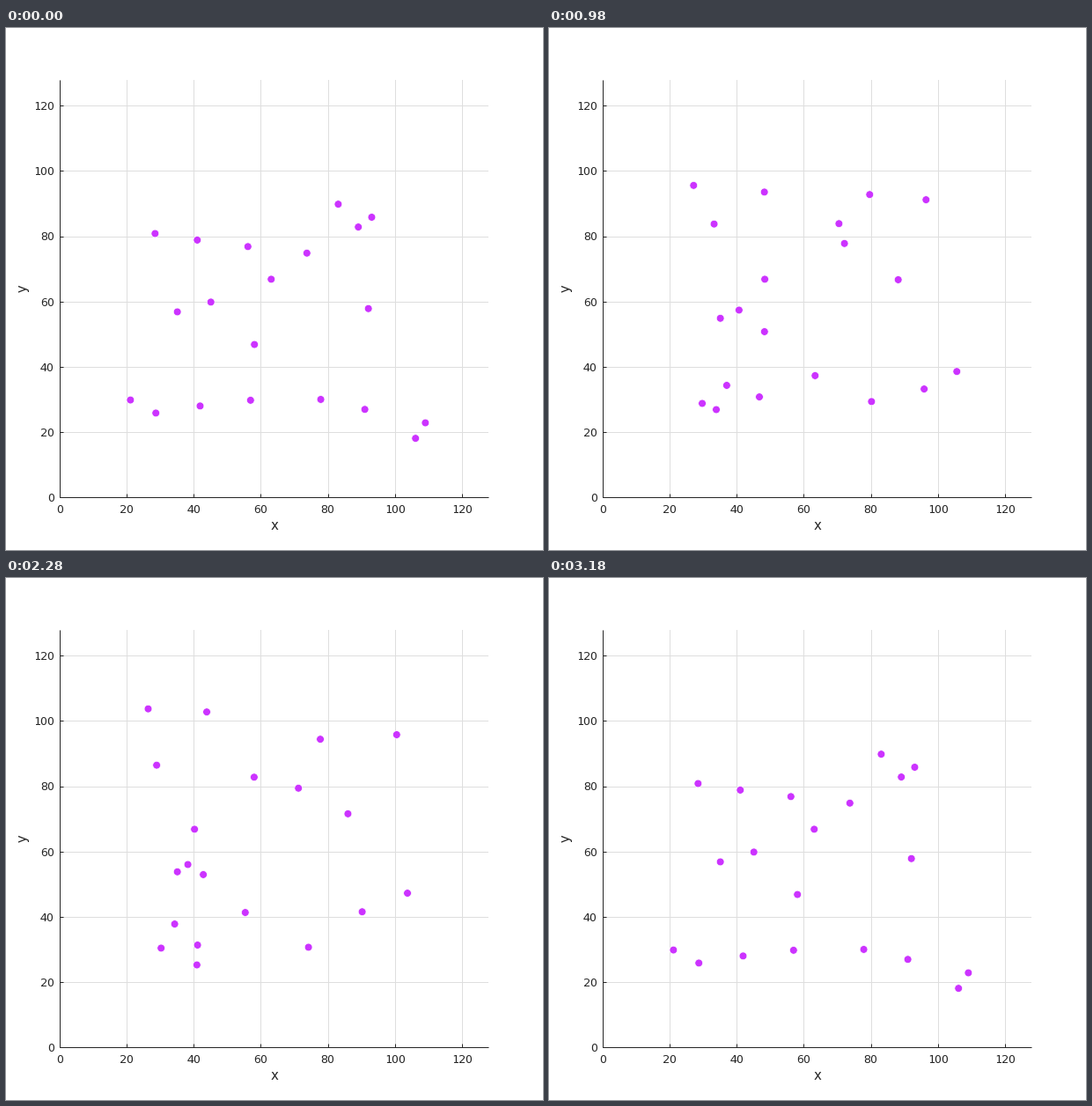
These frames come from a looping animation (610 px wide and 593 px high, 3.2 s). A matplotlib script:

```python
import numpy as np
import matplotlib.pyplot as plt
from matplotlib.animation import FuncAnimation
from matplotlib.collections import EllipseCollection
from matplotlib.transforms import ScaledTranslation

W, H, DPI = 610, 593, 96
PX = 72 / DPI                      # one pixel in points
LEFT, BASE = 61.0, 533.2           # plot origin in pixels from the top left
SX, SY, SPAN = 3.807, 3.7075, 128  # pixels per data unit, axis range
STEPS, HOLD, FRAMES = 59, 20, 160
INK, GRID, VIOLET = "#262626", "#dedede", "#cc33ff"

plt.rcParams.update({"font.family": "DejaVu Sans", "text.hinting_factor": 1})
fig = plt.figure(figsize=(W / DPI, H / DPI), dpi=DPI, facecolor="white")
ax = fig.add_axes([LEFT / W, 1 - BASE / H, SPAN * SX / W, SPAN * SY / H])


def label(x, y, text, size=9.75, **kw):
    fig.text(x / W, 1 - y / H, text, size=size, color=INK, va="baseline", **kw)


def upper_row(i):
    """A falling row that fans out into a zigzag."""
    return (28.35 + 11.35 * i + 1.25 * i**2, 81 - 2 * i,
            25.65 - 8.35 * i + 7.75 * i**2, 111 - i % 2 * (18 + 4 * i))


def middle_row(i):
    """A short arc that closes up into a tight cluster."""
    return (35 + 8.5 * i + 1.5 * i**2, 57 + 11 * i - 8 * i**2,
            35 + i * (i + 1) / 2, 53 + 3 * i - i**2)


def lower_row(i):
    """A shallow arch that bunches to the left in a growing zigzag."""
    return (26 + 16.4 * i + 2.7 * np.cos(2.1 * i - 0.3),
            26 + 2.2 * i - 0.03 * i**4,
            30.2 + 64.5 / (1 + np.exp(1.35 * (3.7 - i))),
            32 + i % 2 * (7 + 2 * i))


# Each dot is x, y at the start and x, y at the end; a few travel alone.
loners = [(83, 90, 76, 96), (89, 83, 104, 100), (93, 86, 47, 82),
          (92, 58, 84, 76), (63, 67, 33, 67), (21, 30, 47, 24),
          (109, 23, 102, 55)]
rows = [(upper_row, 4), (middle_row, 3), (lower_row, 6)]
moves = np.vstack([np.column_stack(f(np.arange(n))) for f, n in rows] + [loners])
start, end = moves[:, :2], moves[:, 2:]

ticks = range(0, 121, 20)
ax.set(xlim=(0, SPAN), ylim=(0, SPAN), xticks=ticks, yticks=ticks)
ax.set_axisbelow(True)
ax.grid(color=GRID, linewidth=PX)
ax.tick_params(direction="in", length=4 * PX, width=PX, color=INK,
               labelleft=False, labelbottom=False)
ax.spines[["top", "right"]].set_visible(False)
for side in ("left", "bottom"):
    ax.spines[side].set(color=INK, linewidth=PX, capstyle="butt")

for v in ticks:
    label(LEFT + v * SX, 551, str(v), ha="center")
    label(55, BASE - v * SY + 4.8, str(v), ha="right")
label(305, 570, "x", 11, ha="center")
label(23.5, 296, "y", 11, ha="center", rotation=90, rotation_mode="anchor")

# Per-dot colours keep sub-pixel placement; the shift centres dots on the lines.
shift = ScaledTranslation(0.4 / DPI, -0.6 / DPI, fig.dpi_scale_trans)
n = len(moves)
dots = EllipseCollection([8.8] * n, [8.8] * n, [0] * n, units="dots",
                         offsets=start, offset_transform=ax.transData + shift,
                         facecolors=[VIOLET] * n, edgecolors=["white"] * n,
                         linewidths=0.7 * PX, zorder=3, clip_on=False)
ax.add_collection(dots, autolim=False)


def update(i):
    out = np.clip(i - HOLD, 0, STEPS)
    back = np.clip(i - FRAMES + STEPS + 1, 0, STEPS)
    dots.set_offsets(start + (end - start) * (out - back) / STEPS)
    return (dots,)


anim = FuncAnimation(fig, update, frames=FRAMES, interval=20,
                     repeat=True, repeat_delay=0)
plt.show()
```
